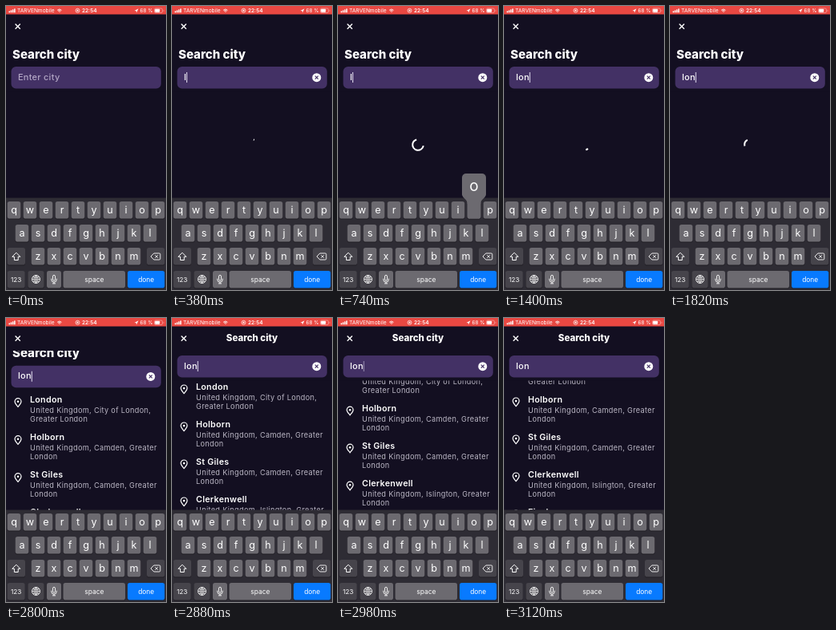
An HTML page with a canvas that plays this animation: 200x356 px, repeating every 3380 ms.

```html
<!DOCTYPE html>
<html lang="en">
<head>
<meta charset="utf-8">
<title>City search</title>
<style>
  html, body { margin: 0; width: 100%; height: 100%; overflow: hidden; background: #130f21; }
  canvas { display: block; width: 200px; height: 356px; }
</style>
</head>
<body>
<canvas id="stage"></canvas>
<script>
const LOOP = 3380, BG = '#130f21', FIELD = '#433165';
const BOARD = '#2e2c34', KEY = '#6c6a70', DARK_KEY = '#46444b', SUBTLE = '#bbb7c5';
const canvas = document.getElementById('stage');
const c = canvas.getContext('2d');
const dpr = window.devicePixelRatio || 1;
canvas.width = 200 * dpr;
canvas.height = 356 * dpr;

const CITIES = [
  ['London', 'United Kingdom, City of London,'],
  ['Holborn', 'United Kingdom, Camden, Greater'],
  ['St Giles', 'United Kingdom, Camden, Greater'],
  ['Clerkenwell', 'United Kingdom, Islington, Greater'],
  ['Finsbury', 'United Kingdom, Islington, Greater']
];
const ROWS = [['qwertyuiop', 10, 245], ['asdfghjkl', 20, 274], ['zxcvbnm', 40, 303]];
// key, press time, release time
const PRESSES = [['l', 160, 280], ['o', 680, 790], ['n', 1100, 1210]];
const SPIN_START = 310, RESULTS_AT = 1860;

const clamp = v => Math.max(0, Math.min(1, v));
const ramp = (t, a, b) => clamp((t - a) / (b - a));

function setFont(size, weight, spacing) {
  c.font = `${weight} ${size}px Inter, sans-serif`;
  c.letterSpacing = spacing + 'px';
}
function text(s, x, y, size, weight = 400, color = '#fff', spacing = 0) {
  setFont(size, weight, spacing);
  c.fillStyle = color;
  c.textAlign = 'left';
  c.fillText(s, x, y);
}
function centered(s, x, y, size, weight = 400) {
  setFont(size, weight, 0);
  c.fillStyle = '#fff';
  c.textAlign = 'center';
  c.fillText(s, x, y);
}
function rect(x, y, w, h, color, r = 0) {
  c.fillStyle = color;
  c.beginPath();
  c.roundRect(x, y, w, h, r);
  c.fill();
}
function line(d, color = '#fff', width = 1) {
  c.strokeStyle = color;
  c.lineWidth = width;
  c.stroke(new Path2D(d));
}
function ring(x, y, r, width = 1, from = 0, to = 2 * Math.PI) {
  c.strokeStyle = '#fff';
  c.lineWidth = width;
  c.beginPath();
  c.arc(x, y, r, from, to);
  c.stroke();
}
function dot(x, y, r) {
  c.fillStyle = '#fff';
  c.beginPath();
  c.arc(x, y, r, 0, 2 * Math.PI);
  c.fill();
}
function at(x, y, draw) {
  c.save();
  c.translate(x, y);
  draw();
  c.restore();
}

// cubic-bezier(.4, 0, .2, 1)
function fastOutSlowIn(x) {
  let lo = 0, hi = 1, u = .5;
  for (let i = 0; i < 18; i++) {
    u = (lo + hi) / 2;
    const bx = 1.2 * u * (1 - u) ** 2 + .6 * u * u * (1 - u) + u ** 3;
    if (bx < x) lo = u; else hi = u;
  }
  return 3 * u * u * (1 - u) + u ** 3;
}

function spinner(t) {
  const phase = t / 1333 % 1, turn = t / 2222 % 1;
  const head = fastOutSlowIn(clamp(phase * 2)) * 1.5 * Math.PI;
  const tail = fastOutSlowIn(clamp(phase * 2 - 1)) * 1.5 * Math.PI;
  const shift = -Math.PI / 2 + turn * 2 * Math.PI + phase * Math.PI / 2;
  ring(100, 174, 6.8, 2, shift + tail, shift + Math.max(head, tail + .01));
}

function cursorAlpha(t) {
  if (t < 2200) return ramp(t, 150, 250) * (1 - ramp(t, 1900, 2060));
  return ramp(t, 2340, 2500) * (1 - ramp(t, 2900, 3080));
}

function scrollAt(t) {
  return 32 * (1 - Math.cos(Math.PI * ramp(t, 2645, 3108)));
}

function results(scroll) {
  CITIES.forEach(([name, area], i) => at(0, 119 + 47 * i - scroll, () => {
    line('M15 8.6C12.6 5.6 11 4 11 2A4 4 0 0 1 19 2C19 4 17.4 5.6 15 8.6Z', '#fff', 1.2);
    dot(15, 2.1, 1.3);
    text(name, 30, 3.8, 10.7, 600, '#fff', .28);
    text(area, 30, 16.7, 9.2, 400, SUBTLE, .31);
    text(i ? 'London' : 'Greater London', 30, 27.7, 9.2, 400, SUBTLE, .31);
  }));
}

function field(t, y) {
  const typed = PRESSES.filter(p => t >= p[2]).map(p => p[0]).join('');
  rect(6.5, y, 187.3, 27.5, FIELD, 6);
  if (typed) {
    dot(180.8, y + 13.7, 5.5);
    at(180.8, y + 13.7, () => line('M-2 -2L2 2M2 -2L-2 2', FIELD, 1.2));
    text(typed, 15, y + 16.8, 10.9, 500, '#fff', .3);
  } else {
    text('Enter city', 15, y + 16.8, 10.9, 500, '#b2a6c5', .3);
  }
  const x = 15 + (typed && c.measureText(typed).width);
  c.globalAlpha = cursorAlpha(t);
  rect(x, y + 7, 1, 13, '#e6e0f2');
  c.globalAlpha = 1;
}

function header(scroll) {
  rect(0, 0, 200, 41, BG);
  line('M11.6 22.6L17.8 28.8M17.8 22.6L11.6 28.8', '#fff', 1.4);
  c.globalAlpha = clamp((scroll - 18) / 14);
  centered('Search city', 100, 28.7, 11.5, 800);
  c.globalAlpha = 1;
}

function statusBar() {
  rect(0, 0, 200, 10.5, '#e94842');
  for (let i = 0; i < 4; i++) rect(3.5 + 2.2 * i, 6.3 - i, 1.5, 2 + i, '#fff', .4);
  text('TARVENmobile', 14, 8.1, 6.6);
  for (const r of [1, 2.4, 3.8]) ring(66.8, 8, r, .9, -2.35, -.79);
  ring(89.5, 5.7, 2.5, .7);
  dot(89.5, 5.7, 1.1);
  text('22:54', 95, 8.1, 6.5, 600);
  c.fillStyle = '#fff';
  c.fill(new Path2D('M160.5 6L165.5 3.3L163 8.5L162.8 6.2Z'));
  text('68 %', 167.5, 8.1, 6.4);
  line('M187 3H194Q195.5 3 195.5 4.5V7Q195.5 8.5 194 8.5H187Q185.5 8.5 185.5 7V4.5Q185.5 3 187 3ZM197 4.8V6.8', '#f6b3b0', .6);
  rect(186.2, 3.8, 6, 3.9, '#fff', .8);
}

function key(x, y, w, color) {
  rect(x, y + .7, w, 21.8, '#1e1c22', 2.8);
  rect(x, y, w, 21.6, color, 2.8);
}

function popup(letter, x, y) {
  rect(x - 8.3, y - 8, 16.6, 29.6, KEY, 2.8);
  rect(x - 15, y - 35, 30, 30, KEY, 5);
  c.fillStyle = KEY;
  at(x, y, () => c.fill(new Path2D('M-15 -10C-15 -3 -8.3 -4 -8.3 3H8.3C8.3 -4 15 -3 15 -10Z')));
  centered(letter, x, y - 13, 19);
}

function keyboard(t) {
  rect(0, 240.5, 200, 115.5, BOARD);
  const pressed = PRESSES.find(p => t >= p[1] && t < p[2]);
  let pop;
  for (const [letters, x0, y] of ROWS) {
    [...letters].forEach((letter, i) => {
      const x = x0 + 20 * i;
      key(x - 8.3, y, 16.6, KEY);
      if (pressed && pressed[0] === letter) pop = [letter, x, y];
      else centered(letter, x, y + 15, 12.6);
    });
  }
  key(1.7, 303, 22.3, DARK_KEY);
  key(176, 303, 22.3, DARK_KEY);
  key(1.7, 332, 22, DARK_KEY);
  key(27.5, 332, 20, DARK_KEY);
  key(51, 332, 18, KEY);
  key(71.5, 332, 77.5, KEY);
  key(152, 332, 46.3, '#087aff');
  centered('123', 12.7, 345.8, 8.2);
  centered('space', 110.3, 345.6, 8.4);
  centered('done', 175.2, 345.6, 8.4);

  at(12.8, 314, () => line('M0 -4.8L5 .3H2.4V4.5H-2.4V.3H-5Z'));
  at(187, 314, () => line('M-6 0L-2.2 -4H4.6Q5.8 -4 5.8 -2.8V2.8Q5.8 4 4.6 4H-2.2ZM-.6 -1.8L3 1.8M3 -1.8L-.6 1.8', '#fff', .9));
  at(37.5, 342.5, () => {
    ring(0, 0, 5, .9);
    line('M0 -5V5M-5 0H5M-4 -2.8Q0 -1.4 4 -2.8M-4 2.8Q0 1.4 4 2.8M0 -5C-3.2 -2 -3.2 2 0 5C3.2 2 3.2 -2 0 -5', '#fff', .7);
  });
  at(60, 342.5, () => {
    line('M-1.5 -3.6A1.5 1.5 0 0 1 1.5 -3.6V.2A1.5 1.5 0 0 1 -1.5 .2Z', '#fff', .9);
    line('M-3.2 -.8V.5A3.2 3.2 0 0 0 3.2 .5V-.8M0 3.7V5.4M-2 5.4H2', '#fff', .9);
  });
  if (pop) popup(...pop);
}

function draw(t) {
  const scroll = scrollAt(t);
  const fieldY = 76 - Math.min(scroll, 29);
  c.setTransform(dpr, 0, 0, dpr, 0, 0);
  rect(0, 0, 200, 356, BG);
  if (t >= RESULTS_AT) results(scroll);
  else if (t >= SPIN_START) spinner(t - SPIN_START);
  rect(0, 0, 200, fieldY + 31.5, BG);
  text('Search city', 8, 65.5 - scroll, 15, 800);
  header(scroll);
  field(t, fieldY);
  statusBar();
  keyboard(t);
}

const start = performance.now();
function tick() {
  draw((performance.now() - start) % LOOP);
  requestAnimationFrame(tick);
}
tick();
</script>
</body>
</html>
```
